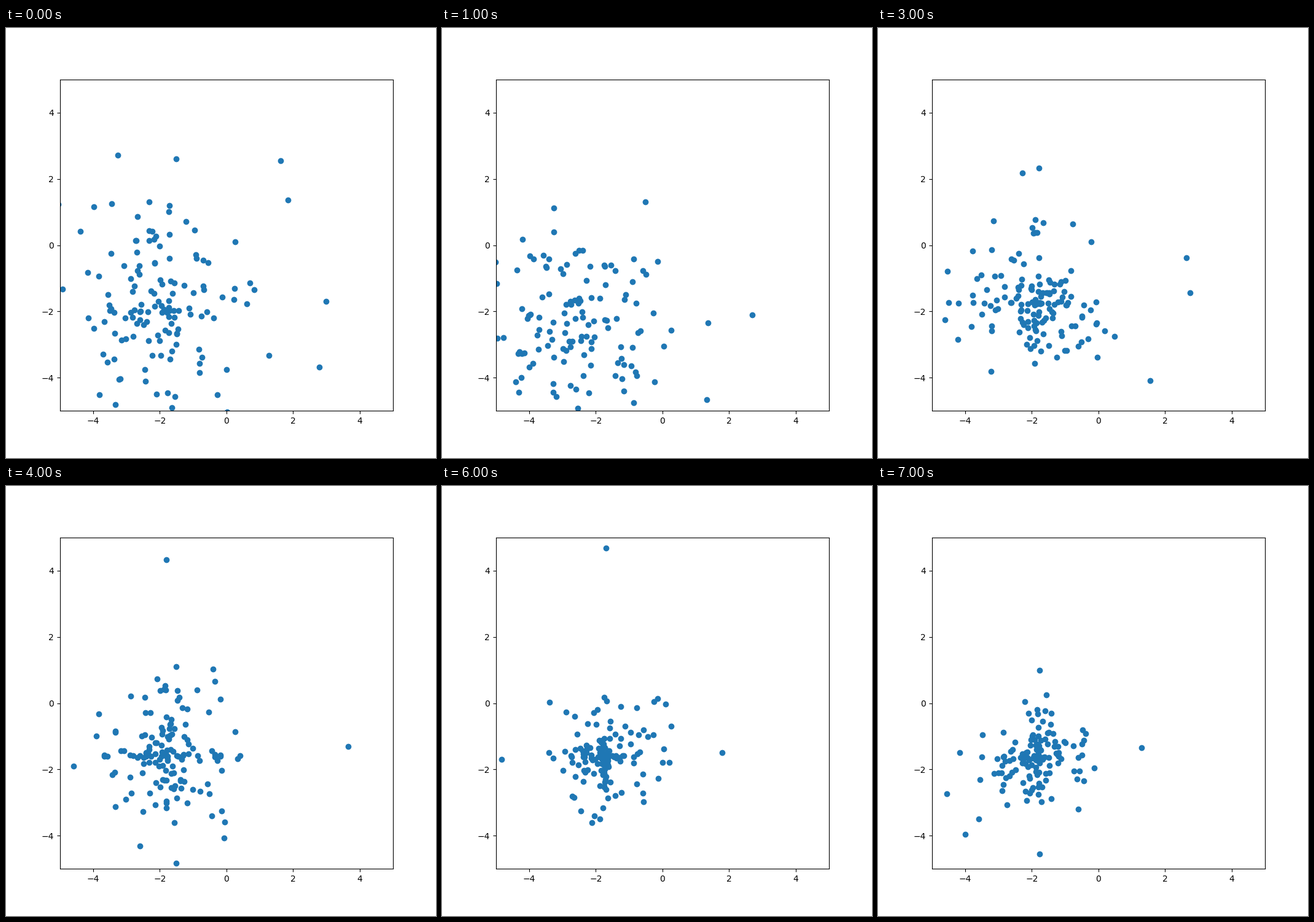
Animation, 700 px wide and 700 px high, one loop 8000 ms. Source, as a matplotlib script:

```python
import numpy as np
import matplotlib.pyplot as plt
from matplotlib.animation import FuncAnimation

# Each swarm state: count, centre x, centre y, spread, tail weight, strays
STATES = [
    (136, -1.9, -2, 1.4, 0.3,
     [(-3.25, 2.72), (-1.5, 2.6), (1.62, 2.55), (1.84, 1.36), (2.99, -1.69),
      (2.78, -3.68)]),
    (120, -2.5, -2.3, 1.4, 0,
     [(-3.25, 1.12), (-0.52, 1.31), (1.36, -2.34), (2.69, -2.1),
      (1.34, -4.67)]),
    (123, -2.1, -2, 1, 0.4,
     [(-2.31, 0.73), (-1.27, 0.46), (-4.63, -2.6), (0.66, -2.1),
      (0.62, -4.29)]),
    (140, -1.9, -1.75, 1, 0.4,
     [(-1.79, 2.33), (-2.29, 2.18), (2.64, -0.38), (2.75, -1.43),
      (1.56, -4.1), (-4.6, -2.25)]),
    (144, -1.8, -1.6, 0.9, 0.6,
     [(-4.59, -1.9), (-1.8, 4.33), (3.66, -1.3), (-1.5, -4.83)]),
    (145, -1.65, -1.5, 0.72, 0.6,
     [(-1.91, 4.03), (-2.16, 3.51), (-3.01, 2.57), (3.54, -1.56),
      (2.49, -1.79), (-4.06, -0.8)]),
    (146, -1.75, -1.6, 0.7, 0.6,
     [(-4.82, -1.7), (-1.7, 4.68), (1.79, -1.5)]),
    (144, -1.8, -1.65, 0.64, 0.6,
     [(-1.77, 1), (-4.54, -2.73), (-4.17, -1.49), (-4, -3.96),
      (-1.76, -4.55), (1.3, -1.34)]),
]
REACH = 2


def swarm(step):
    count, x, y, spread, tail, strays = STATES[step]
    rng = np.random.default_rng(40 + step)
    z = rng.normal(size=(3 * count, 2))
    z = z[np.abs(z).max(axis=1) < REACH][:count]
    core = np.array([x, y]) + spread * z * np.abs(z) ** tail
    return np.vstack([core, strays])


fig, ax = plt.subplots(figsize=(7, 7), dpi=100)
ax.set(xlim=(-5, 5), ylim=(-5, 5))
dots = ax.scatter([], [], color="#1f77b4")


def update(step):
    dots.set_offsets(swarm(step))
    return dots,


anim = FuncAnimation(fig, update, frames=len(STATES), interval=1000,
                     repeat=True, repeat_delay=0)
plt.show()
```
